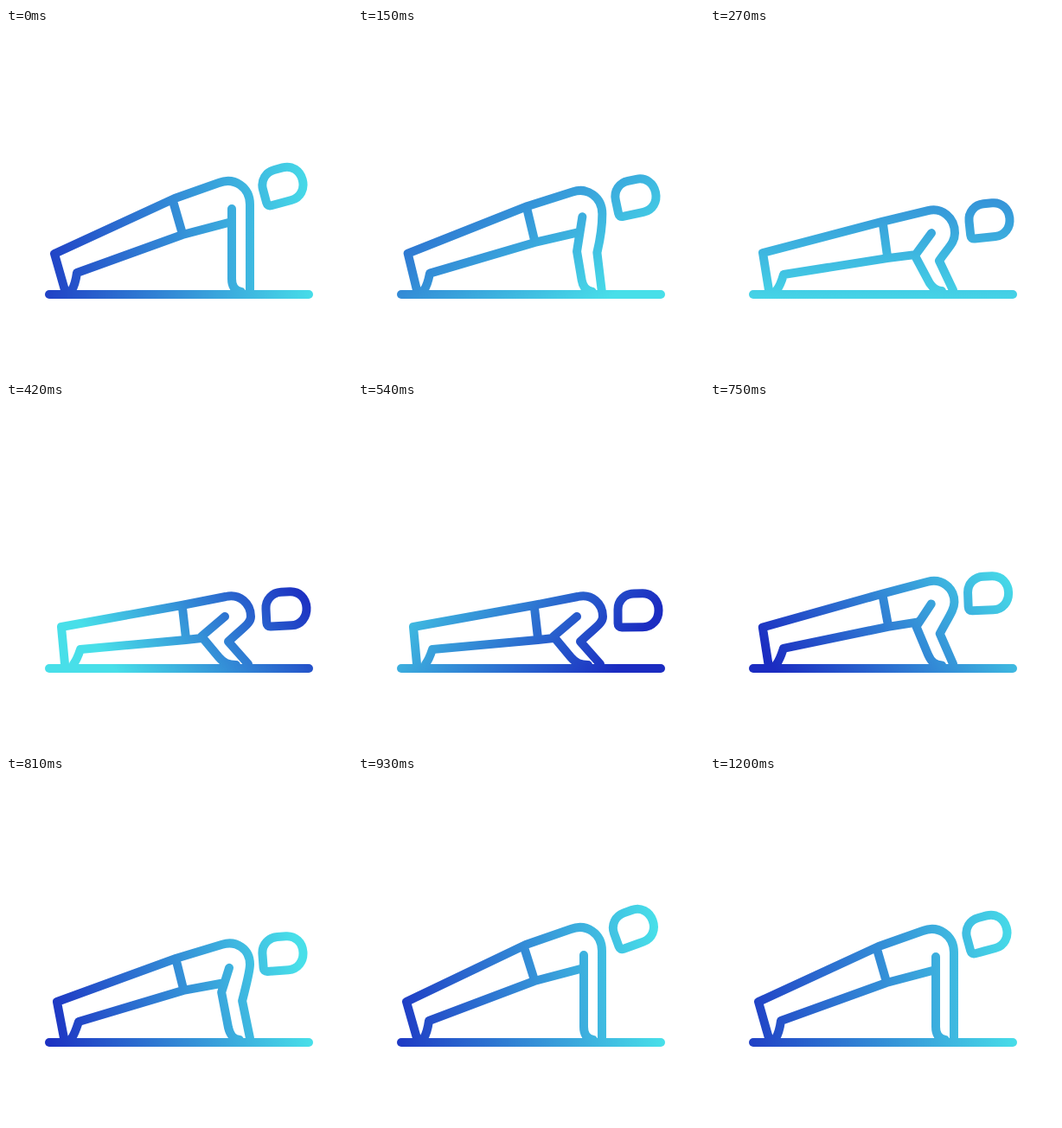
These frames come from a looping animation (400 by 400 pixels, 3230 ms). An HTML page without scripts:

```html
<!DOCTYPE html>
<html lang="en">
<head>
<meta charset="utf-8">
<title>Push-up</title>
<style>
  html, body { margin: 0; width: 100%; height: 100%; overflow: hidden; background: #fff; }
  svg { display: block; width: 100%; height: 100%; }

  .ink { fill: none; stroke: #fff; stroke-width: 10; stroke-linecap: round; stroke-linejoin: round; }
  .body, .head, .shade { animation: 3230ms linear infinite; }
  .body { animation-name: pose; }
  .head { animation-name: nod; }
  .shade { animation-name: turn; }

  /* outline, inner leg, waist, inner arm */
  @keyframes pose {
    0%, 37.15%, 100% {
      d: path("M68 303 L56 261 L195 197 L246 179 C264 172 282 184 282 204 C282 222 282 240 282 255 L282 303 M76 303 C80 297 81 290 82 283 L204 239 L261 224 M193 200 L204 238 M261 209 L261 256 L261 290 C261 298 264 304 272 305");
      animation-timing-function: cubic-bezier(.45, 0, .75, .6);
    }
    8.36% {
      d: path("M68 303 L61 260 L198 224 L252 211 C268 207 283 219 283 237 C283 248 276 253 265 269 L281 303 M77 303 C81 298 83 292 85 285 L205 266 L237 262 M200 227 L205 264 M256 237 L237 263 L254 295 C258 301 262 304 268 304");
      animation-timing-function: cubic-bezier(.3, .5, .6, 1);
    }
    13%, 19% {
      d: path("M68 303 L64 260 L203 235 L254 225 C270 221 283 233 283 248 C283 256 275 260 257 277 L280 303 M78 303 C82 298 84 292 86 286 L208 275 L226 273 M204 238 L208 273 M253 248 L226 271 L246 295 C252 302 257 304 266 304");
      animation-timing-function: ease-in;
    }
    20.43% {
      d: path("M68 303 L63 260 L203 234 L254 223 C270 220 283 232 283 247 C283 255 275 259 257 277 L280 303 M78 303 C82 298 84 292 86 286 L207 274 L227 272 M203 237 L207 272 M253 247 L226 271 L247 295 C252 302 257 304 266 304");
      animation-timing-function: cubic-bezier(.4, .2, .7, .7);
    }
    25.08% {
      d: path("M67 303 L59 261 L197 211 L250 195 C266 190 282 200 282 218 C282 226 279 236 273 260 L282 303 M76 303 C80 297 82 290 84 284 L205 248 L249 240 M197 214 L205 246 M258 222 L249 250 L257 291 C259 299 262 304 270 305");
      animation-timing-function: cubic-bezier(.3, .5, .6, 1);
    }
    28.79% {
      d: path("M68 303 L56 261 L194 195 L246 177 C264 170 282 182 282 202 C282 220 282 240 282 255 L282 303 M76 303 C80 297 81 290 82 283 L204 237 L261 222 M192 198 L204 236 M261 207 L261 256 L261 290 C261 298 264 304 272 305");
      animation-timing-function: ease-in-out;
    }
  }

  @keyframes nod {
    0%, 37.15%, 100% { transform: translate(320px, 181.5px) rotate(-15deg); animation-timing-function: cubic-bezier(.45, 0, .75, .6); }
    8.36% { transform: translate(323px, 222px) rotate(-6deg); animation-timing-function: cubic-bezier(.3, .5, .6, 1); }
    13% { transform: translate(324px, 239px) rotate(-3deg); animation-timing-function: ease-out; }
    17.65% { transform: translate(324px, 241px) rotate(0deg); animation-timing-function: ease-in; }
    20.43% { transform: translate(323.5px, 239.5px) rotate(0deg); animation-timing-function: cubic-bezier(.4, .2, .7, .7); }
    25.08% { transform: translate(320px, 205.5px) rotate(-4deg); animation-timing-function: cubic-bezier(.3, .5, .6, 1); }
    28.79% { transform: translate(318.5px, 175px) rotate(-20deg); animation-timing-function: ease-in-out; }
  }

  @keyframes turn {
    0% { transform: translate(182px, 190px) rotate(0deg) scale(.99); }
    8.36% { transform: translate(190px, 172px) rotate(90deg) scale(.9); }
    13% { transform: translate(199px, 211px) rotate(143deg) scale(.65); }
    16.72% { transform: translate(195px, 205px) rotate(214deg) scale(.8); }
    20.43% { transform: translate(192px, 241px) rotate(285deg) scale(.73); }
    25.08% { transform: translate(178px, 190px) rotate(351deg) scale(.86); }
    28.79% { transform: translate(180px, 190px) rotate(357deg) scale(.92); }
    37.15%, 100% { transform: translate(182px, 190px) rotate(360deg) scale(.98); }
  }
</style>
</head>
<body>
<svg viewBox="0 0 400 400">
  <defs>
    <linearGradient id="blue" gradientUnits="userSpaceOnUse" x1="-180" y1="0" x2="180" y2="0">
      <stop offset="0" stop-color="#1b2cc1"/>
      <stop offset="1" stop-color="#48dfe9"/>
    </linearGradient>
    <mask id="figure" maskUnits="userSpaceOnUse" x="0" y="0" width="400" height="400">
      <g class="ink">
        <path d="M50 308H350"/>
        <path class="body"/>
        <path class="head" d="M-19 19.5Q-23.5 19.5 -23.5 15V-1C-23.5 -12 -15 -19.5 -5 -19.5H5C16 -19.5 23.5 -11 23.5 0C23.5 11 16 19.5 5 19.5Z"/>
      </g>
    </mask>
  </defs>
  <g mask="url(#figure)">
    <rect class="shade" x="-900" y="-900" width="1800" height="1800" fill="url(#blue)"/>
  </g>
</svg>
</body>
</html>
```
